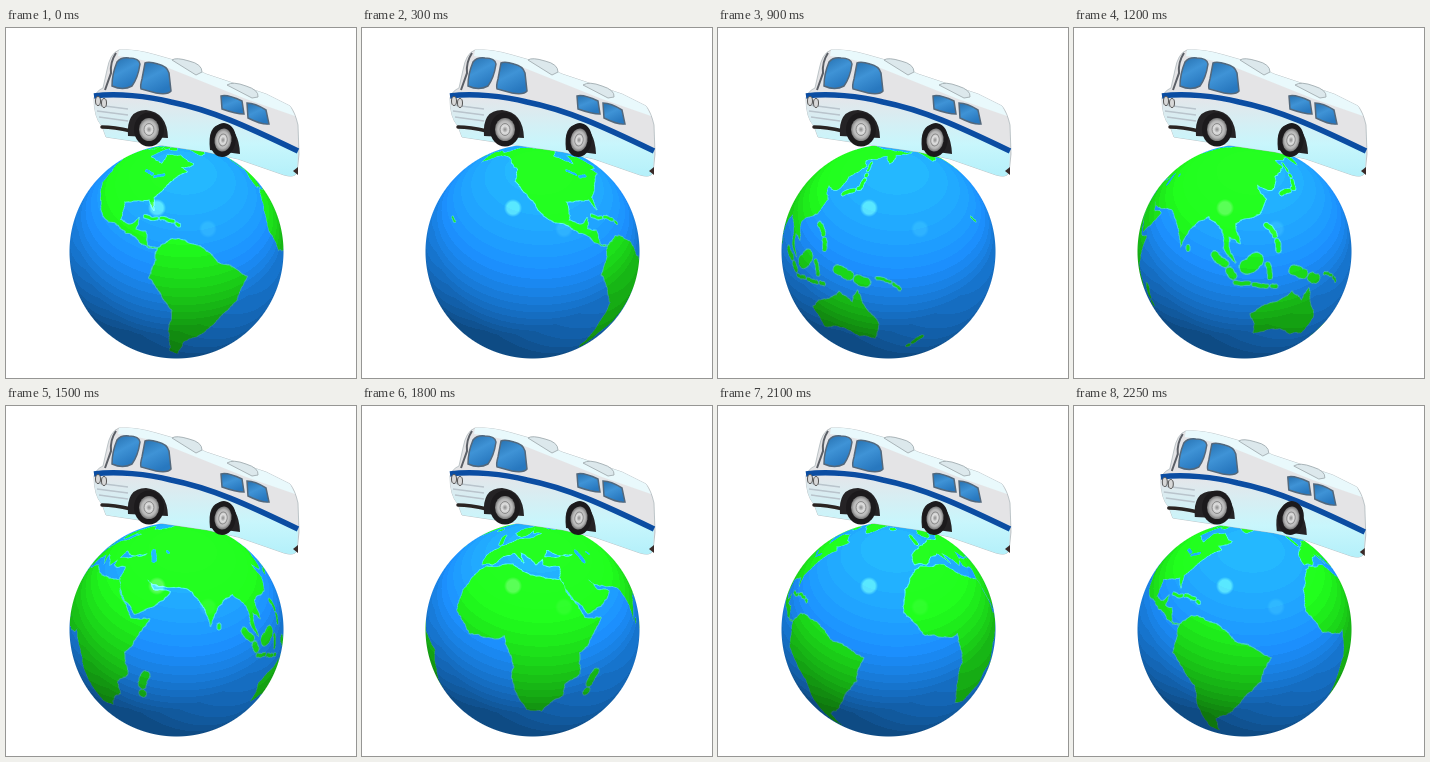
An HTML page with a canvas that plays this animation: 350 by 350 pixels, repeating every 2.4 s.

```html
<!DOCTYPE html>
<html lang="en">
<head>
<meta charset="utf-8">
<title>Camper on the globe</title>
<style>
  html, body { margin: 0; width: 100%; height: 100%; overflow: hidden; background: #fff; }
  canvas, svg { position: absolute; left: 0; top: 0; width: 350px; height: 350px; }
</style>
</head>
<body>
<canvas id="globe" width="350" height="350"></canvas>
<svg viewBox="0 0 350 350">
  <defs>
    <linearGradient id="skirt" x1="0" y1="0" x2="0" y2="1">
      <stop offset="0" stop-color="#e4e6ea"/><stop offset=".6" stop-color="#c8f6fc"/><stop offset="1" stop-color="#b4f0fa"/>
    </linearGradient>
    <linearGradient id="glass" x1="0" y1="0" x2=".5" y2="1">
      <stop offset="0" stop-color="#256fae"/><stop offset=".5" stop-color="#3f93d6"/><stop offset="1" stop-color="#2878bf"/>
    </linearGradient>
    <radialGradient id="hub">
      <stop offset="0" stop-color="#888"/><stop offset=".3" stop-color="#ddd"/>
      <stop offset=".75" stop-color="#b4b4b4"/><stop offset="1" stop-color="#777"/>
    </radialGradient>
    <g id="wheel">
      <ellipse rx="15" ry="17" fill="#1c1a1c"/>
      <ellipse rx="10" ry="11.500" fill="url(#hub)"/>
      <ellipse rx="5" ry="6" fill="none" stroke="#888"/>
    </g>
  </defs>
  <g id="body">
    <path d="M113 22Q130 21 150 27L171 33L200 46L260 66L284 78Q289 84 292 97L293 126L291 145Q288 150 278 147L232 131L201 124L160 118L100 109L96 98Q88 90 88 70Q90 63 97 60L101 42Q104 25 113 22Z" fill="#e4e4e6" stroke="#a5b0b5" stroke-width=".7"/>
    <path d="M113 22Q130 21 150 27L171 33L200 46L260 66L284 78L289 88L240 71L170 43Q142 31 112 28Z" fill="#e9f9fc"/>
    <path d="M166 32Q170 29 183 33Q196 36 196 44L190 47ZM221 57Q227 53 240 58Q253 62 252 69L246 70Z" fill="#dce8ec" stroke="#a9b4b8"/>
    <path d="M88 70Q130 67 165 76C205 83 240 99 292 124L291 145Q288 150 278 147L232 131L201 124L160 118L100 109L96 98Q88 90 88 70Z" fill="url(#skirt)"/>
    <path d="M88 68C110 65 142 68 165 74C205 82 240 98 292 123" fill="none" stroke="#0b4da2" stroke-width="5.500"/>
    <g fill="url(#glass)" stroke="#53687c" stroke-width="1.500">
      <path d="M111 34Q115 29 123 30Q133 30 134 36Q132 50 126 58Q117 63 106 58Q106 46 111 34Z"/>
      <path d="M139 35Q143 33 152 36Q161 38 163 45L165 63Q162 67 150 65L135 61Q134 58 136 51Z"/>
      <path d="M215 68Q221 66 236 73L238 86Q230 86 216 81Z"/>
      <path d="M241 75Q249 75 260 82L263 96Q256 97 242 90Z"/>
    </g>
    <path d="M110 25Q104 34 105 45L99 62" fill="none" stroke="#5b5f66" stroke-width="2"/>
    <path d="M91 77L122 81M91 83L122 87M93 89L122 93" stroke="#b9c4cc" stroke-width="1.500"/>
    <g fill="#d8d8d8" stroke="#555"><ellipse cx="92" cy="73" rx="2.500" ry="4.500"/><ellipse cx="98" cy="75" rx="2.500" ry="4.500"/></g>
    <path d="M96 99Q108 99 125 103" fill="none" stroke="#2a2422" stroke-width="3.500" stroke-linecap="round"/>
    <path d="M287 143L292 139L292 147Z" fill="#3a2a28"/>
    <path d="M122 108Q120 82 140 82Q161 84 162 110ZM204 122Q201 97 216 96Q233 100 234 126Z" fill="#252325"/>
  </g>
  <use id="front" href="#wheel"/>
  <use id="rear" href="#wheel"/>
</svg>
<script>
const STEP = 150, STEPS = 16;
const CX = 170.5, CY = 223.5, R = 107, CAMERA = 4.57, TILT = 6.6 * Math.PI / 180, START_LON = -69;
const MAP_W = 1440, MAP_H = 720, SCALE = 4;

// Key capes and bays as longitude / latitude pairs; roughen() adds the detail
const continents = {
  northAmerica: "-167 66 -128 70 -95 70 -82 68 -94 59 -80 52 -78 60 -65 60 -56 52 -66 49 -62 46 -70 42 -76 36 -81 31 -80 25 -83 30 -97 29 -97 20 -91 18 -87 21 -88 16 -83 15 -82 9 -77 8 -85 10 -95 16 -105 20 -114 31 -109 23 -117 33 -124 40 -124 48 -135 58 -150 60 -163 55",
  greenland: "-45 60 -54 68 -66 77 -45 83 -20 80 -25 70",
  southAmerica: "-77 8 -71 12 -60 9 -50 1 -35 -6 -39 -17 -48 -27 -57 -37 -65 -41 -68 -54 -74 -50 -71 -20 -81 -5",
  africa: "-6 36 -16 24 -17 14 -8 4 9 4 13 -10 12 -17 18 -33 26 -34 36 -25 36 -19 43 -14 42 -4 54 11 45 11 35 29 20 31 10 37",
  europe: "-9 37 -2 37 3 42 9 44 16 38 13 45 23 37 28 41 30 46 41 43 50 43 60 50 67 68 40 65 36 69 26 71 13 66 5 60 12 56 24 66 22 60 30 60 21 55 9 54 -1 49 -9 43",
  asia: "27 41 27 37 36 36 35 30 41 19 47 13 56 17 63 23 55 24 51 29 58 26 70 25 76 20 81 8 85 16 94 22 101 16 102 8 107 2 104 13 109 10 107 19 118 23 122 30 118 38 126 35 130 43 140 50 137 55 155 59 157 52 163 60 190 66 140 72 104 77 70 72 60 68 55 50 45 42 36 41",
  australia: "114 -22 116 -34 131 -32 139 -37 148 -38 151 -28 142 -11 139 -17 133 -12 123 -17"
};
// Island chains: line width in degrees, then the ends of the chain
const chains = {
  madagascar: [3.5, "52 -14 49 -24"], britain: [3, "-3 51 -4 57"], iceland: [3, "-21 65 -17 65"],
  arctic: [5, "-110 72 -70 68"], antilles: [1.2, "-84 22 -68 18"], japan: [2, "131 33 140 36 142 44"],
  philippines: [2, "121 18 126 7"], borneo: [6, "112 0 116 3"], sumatra: [3, "98 5 106 -4"],
  java: [1.5, "107 -7 125 -9"], sulawesi: [1.8, "121 1 122 -5"], newGuinea: [4, "133 -2 146 -7"],
  solomons: [1, "151 -5 161 -10"], newZealand: [2.5, "176 -38 169 -45"], sakhalin: [1.5, "142 47 143 54"],
  ceylon: [1.5, "85 8 85 7"], hawaii: [0.7, "-158 21 -155 19"]
};
const lakes = { caspian: [3, "51 45 53 38"], greatLakes: [1.8, "-90 47 -83 43 -77 44"], aral: [1.5, "60 45 61 44"] };

let seed = 7;
const random = () => (seed = seed * 16807 % 2147483647) / 2147483647;

function roughen([ax, ay], [bx, by], out) {
  const dx = bx - ax, dy = by - ay;
  if (Math.hypot(dx, dy) < 1.5) return out.push([bx, by]);
  const bend = (random() - 0.5) * 0.22;
  const mid = [(ax + bx) / 2 - dy * bend, (ay + by) / 2 + dx * bend];
  roughen([ax, ay], mid, out);
  roughen(mid, [bx, by], out);
}

function coast(text, closed) {
  const points = text.match(/\S+ \S+/g).map(pair => pair.split(" ").map(Number));
  const out = [points[0]];
  points.slice(1).forEach((p, i) => roughen(points[i], p, out));
  if (closed) roughen(points.at(-1), points[0], out);
  return new Path2D("M" + out.join(" ") + (closed ? "Z" : ""));
}

function drawMap() {
  const canvas = document.createElement("canvas");
  canvas.width = MAP_W;
  canvas.height = MAP_H;
  const g = canvas.getContext("2d", { willReadFrequently: true });
  const mainland = Object.values(continents).map(text => coast(text, true));
  const lines = set => Object.values(set).map(([width, text]) => ({ width, path: coast(text, false) }));
  const islands = lines(chains), water = lines(lakes);
  g.lineJoin = g.lineCap = "round";

  function stroke(list, color, extra = 0) {
    g.strokeStyle = color;
    for (const { width, path } of list) {
      g.lineWidth = width + extra;
      g.setLineDash([6, width + 0.8]);
      g.stroke(path);
    }
    g.setLineDash([]);
  }

  // Red marks land, green marks the pale shoreline
  for (const shift of [0, -360]) {
    g.setTransform(SCALE, 0, 0, -SCALE, MAP_W / 2 + shift * SCALE, MAP_H / 2);
    stroke(islands, "#0f0", 0.7);
    g.lineWidth = 0.7;
    mainland.forEach(path => g.stroke(path));
    g.fillStyle = "#f00";
    mainland.forEach(path => g.fill(path));
    stroke(islands, "#f00");
    stroke(water, "#000");
  }
  return g.getImageData(0, 0, MAP_W, MAP_H).data;
}

const clamp = (v, lo, hi) => Math.min(hi, Math.max(lo, v));
const map = drawMap();
const pixels = [];
const focal = R * Math.sqrt(CAMERA * CAMERA - 1);

// Cast a ray through (x, y) onto the unit sphere
function hit(x, y) {
  const u = (x - CX) / focal, v = (CY - y) / focal, a = u * u + v * v + 1;
  const root = Math.sqrt(Math.max(0, CAMERA * CAMERA - a * (CAMERA * CAMERA - 1)));
  const t = (CAMERA - root) / a;
  return [t * u, t * v, CAMERA - t];
}

function mapCell([x, y, z]) {
  const up = y * Math.cos(TILT) + z * Math.sin(TILT);
  const depth = z * Math.cos(TILT) - y * Math.sin(TILT);
  const lat = Math.asin(clamp(up, -1, 1)), lon = Math.atan2(x, depth);
  return {
    row: clamp(Math.floor((0.5 - lat / Math.PI) * MAP_H), 0, MAP_H - 1) * MAP_W,
    col: (lon / (2 * Math.PI) + 0.5) * MAP_W
  };
}

// Two lamps, rounded to visible bands
function shade([x, y, z]) {
  const key = Math.max(0, -0.32 * x + 0.73 * y + 0.6 * z);
  const fill = Math.max(0, 0.55 * x + 0.4 * y + 0.73 * z);
  return 0.5 + Math.round((0.48 * key + 0.35 * fill) * 22) / 22;
}

const glow = (x, y, radius, strength) => clamp((radius - Math.hypot(x, y)) / 3, 0, 1) * strength;

for (let y = Math.floor(CY - R - 1); y <= CY + R; y++) {
  for (let x = Math.floor(CX - R - 1); x <= CX + R; x++) {
    const px = x + 0.5, py = y + 0.5;
    const alpha = clamp(R + 0.5 - Math.hypot(px - CX, py - CY), 0, 1);
    if (!alpha) continue;
    const cells = [];
    for (const dy of [-0.25, 0.25]) for (const dx of [-0.25, 0.25]) cells.push(mapCell(hit(px + dx, py + dy)));
    const glint = glow(px - 151, py - 180, 9, 55) + glow(px - 202, py - 201, 9, 14);
    pixels.push({ at: (y * 350 + x) * 4, alpha, cells, light: shade(hit(px, py)), glint });
  }
}

const OCEAN = [29, 150, 265], LAND = [30, 236, 27], SHORE = [70, 205, 205];
const ctx = document.getElementById("globe").getContext("2d");
const image = ctx.createImageData(350, 350);

function drawGlobe(step) {
  const turn = (START_LON - step * 360 / STEPS + 720) * SCALE;
  for (const { at, alpha, cells, light, glint } of pixels) {
    let ground = 0, shore = 0;
    for (const { row, col } of cells) {
      const i = (row + Math.floor(col + turn) % MAP_W) * 4;
      ground += map[i] / 1020;
      shore += map[i + 1] / 1020;
    }
    const sea = Math.max(0, 1 - ground - shore);
    for (let c = 0; c < 3; c++) {
      const base = OCEAN[c] * sea + LAND[c] * ground + SHORE[c] * shore;
      image.data[at + c] = base * light + glint;
    }
    image.data[at + 3] = alpha * 255;
  }
  ctx.putImageData(image, 0, 0);
}

const [body, front, rear] = ["body", "front", "rear"].map(id => document.getElementById(id));

// The body bounces hard on every fourth step; the wheels follow less
function drawBus(step) {
  const lift = [0, 8, 0, -3][step % 4], hop = Math.max(0, lift);
  body.setAttribute("transform", `translate(${lift * 0.4} ${-lift})`);
  front.setAttribute("transform", `translate(${143 - hop * 0.3} ${101.5 - hop * 0.7})`);
  rear.setAttribute("transform", `translate(217 ${112 - hop * 0.2}) rotate(8) scale(.85 1)`);
}

let shown = -1;
function tick() {
  const step = Math.floor(performance.now() / STEP) % STEPS;
  if (step !== shown) {
    shown = step;
    drawGlobe(step);
    drawBus(step);
  }
  requestAnimationFrame(tick);
}
tick();
</script>
</body>
</html>
```
